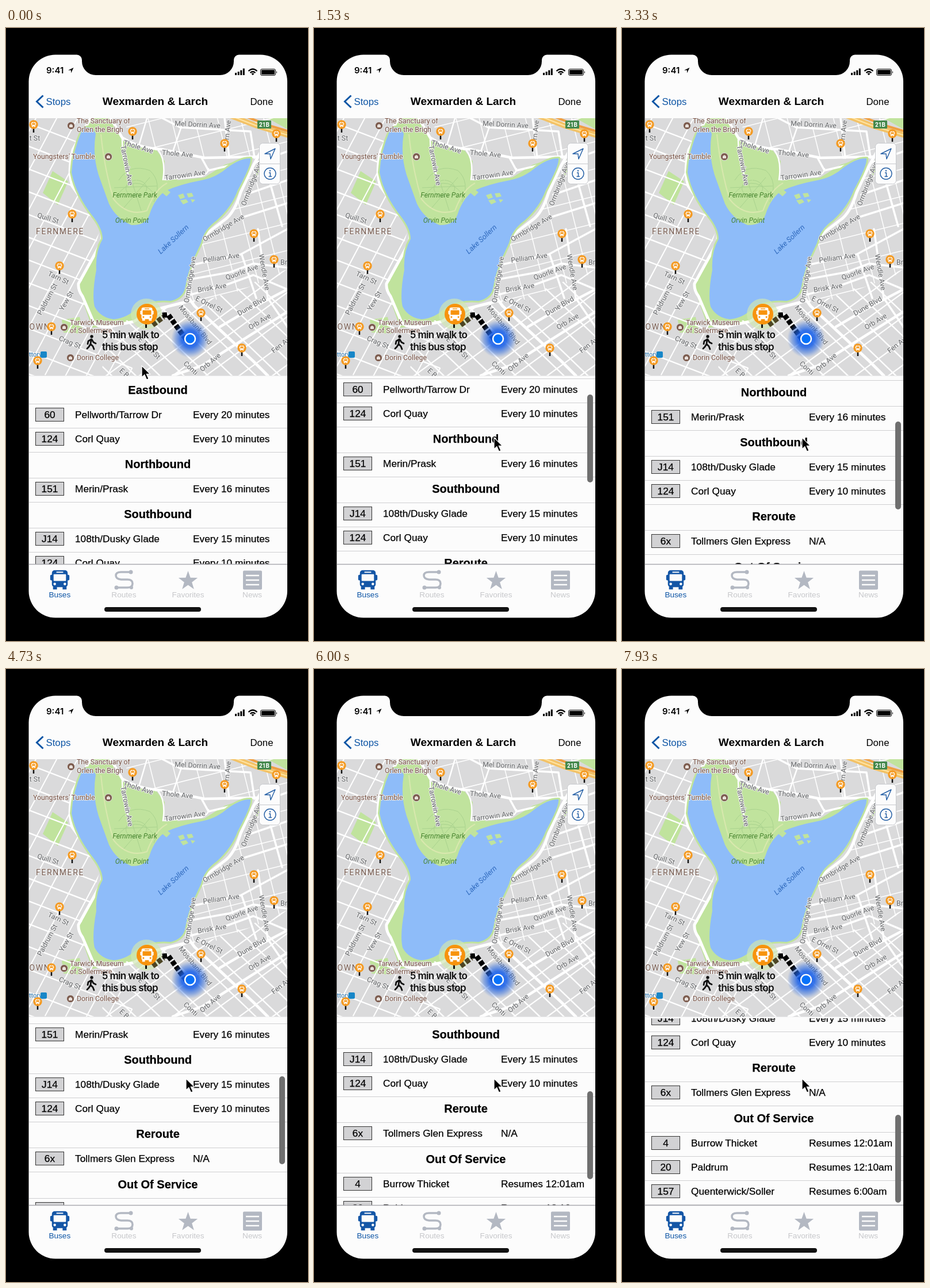
Animation, 525 px wide and 1067 px high, one loop 8000 ms. Source, as an HTML page:

```html
<!DOCTYPE html>
<html lang="en">
<head>
<meta charset="utf-8">
<title>Bus stop</title>
<style>
html, body { margin: 0; width: 100%; height: 100%; overflow: hidden; background: #000; }
svg { display: block; width: 100%; height: 100%; }
text { font-family: "Liberation Sans", Arial, sans-serif; font-size: 17.3px; fill: #000; }
#list text { stroke: #000; stroke-width: .25px; }
.map text { font: 12.3px Roboto, sans-serif; fill: #626467; text-anchor: middle; paint-order: stroke; stroke: #eee; stroke-width: 2px; stroke-linejoin: round; }
.map .place { fill: #775245; text-anchor: start; }
.map .park { font-style: italic; fill: #48852f; stroke: none; }
.map .water { font-style: italic; fill: #2e69bd; stroke: none; font-size: 12.8px; }
.map .area { font-size: 14px; letter-spacing: 1.6px; fill: #765b50; }
.map .walk { font: 600 17px Inter, sans-serif; letter-spacing: -.65px; fill: #111; text-anchor: start; stroke: none; }
.head { font-weight: bold; font-size: 20px; text-anchor: middle; }
.num { text-anchor: middle; }
.tab { font-size: 13.6px; text-anchor: middle; fill: #c7c8cb; }
.road { fill: none; stroke: #fff; stroke-linejoin: round; stroke-linecap: round; }
</style>
</head>
<body>
<svg id="stage" viewBox="0 0 525 1067" xmlns="http://www.w3.org/2000/svg">
  <defs>
    <clipPath id="mapClip"><rect x="40" y="157" width="449" height="448.500"/></clipPath>
    <clipPath id="listClip"><rect x="40" y="608" width="449" height="325"/></clipPath>
    <clipPath id="west"><path d="M40 157H143L112 230L113 270L163 352L150 400L125 455L148 508L190 520L225 605H40Z"/></clipPath>
    <clipPath id="south"><path d="M180 516L222 506L252 490L305 480L360 470L489 420V605H165Z"/></clipPath>
    <clipPath id="north"><path d="M200 157H489V425L360 475L318 478L326 410L345 365L395 320L436 230L345 226L230 208Z"/></clipPath>
    <radialGradient id="glow">
      <stop offset="0" stop-color="#0b5fff"/><stop offset=".45" stop-color="#175fe8" stop-opacity=".85"/>
      <stop offset=".75" stop-color="#2d6be0" stop-opacity=".45"/><stop offset="1" stop-color="#3d76e0" stop-opacity="0"/>
    </radialGradient>
  </defs>

  <rect width="525" height="1067"/>
  <path fill="#fcfcfc" d="M86 46.500H123A9 9 0 0 1 132 55.500V58A24 24 0 0 0 156 82H372A24 24 0 0 0 396 58V55.500A9 9 0 0 1 405 46.500H442.500A46.500 46.500 0 0 1 489 93V980A46.500 46.500 0 0 1 442.500 1026.500H86A46.500 46.500 0 0 1 39.500 980V93A46.500 46.500 0 0 1 86 46.500Z"/>

  <g id="status">
    <text x="70" y="79" style="font:600 15px Inter,sans-serif">9:41</text>
    <path d="M108 73.500L117.500 69L113 78.500V73.500Z"/>
    <path d="M398 78h3v4h-3zM402.700 76h3v6h-3zM407.300 73.500h3v8.500h-3zM411.800 70.500h3v11.500h-3z"/>
    <path fill="none" stroke="#000" stroke-width="2.300" d="M421.500 75Q429 68 436.500 75M424.500 78Q429 74 433.500 78"/>
    <path d="M426.500 79.500Q429 77.500 431.500 79.500L429 82.200Z"/>
    <rect x="442.500" y="71.500" width="26" height="11" rx="2.500" fill="none" stroke="#000"/>
    <rect x="444" y="73" width="23" height="8" rx="1"/><path d="M470 75q2 2 0 4z"/>
  </g>
  <path fill="none" stroke="#0d55a5" stroke-width="3" d="M64.500 117.500L53.500 128L64.500 138.500"/>
  <text x="69.500" y="134" style="fill:#0d55a5;font-size:16.800px">Stops</text>
  <text x="259.500" y="134" class="head" style="font-size:19px">Wexmarden &amp; Larch</text>
  <text x="464.500" y="134" text-anchor="end" style="font-size:16.800px">Done</text>

  <g class="map" clip-path="url(#mapClip)">
    <rect x="39" y="157" width="450" height="449" fill="#dadadb"/>
    <g id="green" fill="#c0e39d">
      <path d="M144 157H180L204 197L262 213L276 232L272 265L300 260L292 276L262 300L240 350H190L140 240Z"/>
      <path d="M64 287L81 249L108 267L90 308Z"/>
      <path d="M160 385L124 449L150 522L218 512L252 487L165 480Z"/>
      <path d="M262 302L278 267L345 260L380 238L430 222L425 240L395 250L300 290Z"/>
      <path d="M97 508L128 503L135 532L100 530ZM455 157H489V176ZM440 228L449 230L434 262Z"/>
    </g>
    <g id="grids" class="road"></g>
    <g class="road" stroke-width="3.500">
      <path stroke-width="5" d="M147 157L116 212Q107 250 115 275L160 338Q172 360 163 378L126 445Q125 456 133 467L150 507Q156 522 178 520L222 511L252 492L312 477"/>
      <path stroke-width="4.500" d="M182 157L202 191Q230 209 270 211L345 226L440 224"/>
      <path stroke-width="5" d="M443 215L428 243L408 286Q397 322 380 334L350 357Q329 385 324 415L314 465L328 484L430 580L455 605"/>
      <path d="M272 157L303 173L425 180M380 157L388 226M425 180L432 226M340 226L352 248L420 232"/>
      <path stroke-width="2.500" d="M276 264L340 258Q352 253 352 245M202 194Q202 235 216 263M265 213Q278 230 273 264M230 208L245 157M290 215L310 157"/>
      <path d="M330 411L408 394L489 350M323 437L390 425L430 410L489 417M318 465L380 448L430 430L489 455M410 395L435 470M438 350L455 470L489 520M403 332L489 305M416 290L489 265M432 235L489 215M455 255L480 345"/>
      <path stroke-width="4.500" d="M372 520L430 486L489 455M290 605L340 588L489 494"/>
    </g>
    <path fill="none" stroke="#f3c266" stroke-width="9" d="M386 151L435 170L495 188"/>
    <path fill="none" stroke="#ef9f42" stroke-width="4" d="M417 154L455 169L495 181"/>
    <path fill="none" stroke="#ffe4a4" stroke-width="2" d="M386 151L435 170L495 188"/>
    <path fill="#8ebcf9" stroke="#c0e39d" stroke-width="6" paint-order="stroke" d="M132 178Q145 165 156 184Q150 220 161 256L179 306Q191 331 218 343Q242 344 249 326Q257 299 276 284Q302 272 340 265Q366 260 385 243Q408 226 425 227Q427 238 403 282Q392 312 366 335Q344 351 339 374L326 402Q316 425 312 449Q309 470 286 475Q250 472 228 487Q211 505 187 507Q164 504 154 485Q149 464 157 421Q155 390 168 367Q168 350 152 329Q121 290 114 251Q116 215 132 178Z"/>
    <path fill="#c0e39d" d="M272 287l8-6 6 5-7 7zM299 291l9-3 3 7-8 3zM314 288l9-1 3 6-9 2zM303 300l10-2 4 5-9 4zM321 298l8 1-5 5z"/>
    <path fill="none" stroke="#a9d28e" stroke-width="1" d="M196 265Q215 235 250 248Q272 268 257 303M191 293Q225 250 257 288M203 315L250 260M215 255L235 318M188 278L262 275M226 265a18 14 0 1 0 1 0"/>
    <path fill="none" stroke="#d9e8ae" stroke-width="2" d="M165 185Q171 245 187 298Q212 329 245 318Q259 280 280 270"/>
    <rect x="437" y="161" width="24" height="14" rx="1" fill="#44884c"/>
    <text x="449" y="172" style="font-size:10px;font-weight:700;fill:#fff;stroke:none">21B</text>
    <g id="labels"></g>
    <g id="pins"></g>
    <circle cx="244" cy="498" r="27" fill="#d0e8b4" opacity=".68"/>
    <path stroke="#111" stroke-width="3" d="M243.500 512V522"/>
    <g fill="none" stroke="#000" stroke-width="9" stroke-dasharray="8 3">
      <path stroke="#4c4525" d="M255 517L274 503"/><path d="M272 500L282 499L313 542"/>
    </g>
    <circle cx="245" cy="498" r="18" fill="#f7930d"/>
    <g id="stop"></g>
    <circle cx="320" cy="541" r="33" fill="url(#glow)"/>
    <circle cx="320" cy="541" r="9" fill="#0872fa" stroke="#fff" stroke-width="2.500"/>
    <g fill="none" stroke="#111" stroke-width="2.800" stroke-linecap="round" stroke-linejoin="round">
      <circle cx="149" cy="537" r="1.300"/><path d="M148 542L147 550L151 554L153 559M147 550L144 555L141 558M148 542L143 545L142 550M149 542L152 547L156 549"/>
    </g>
    <text class="walk" x="167" y="540">5 min walk to</text>
    <text class="walk" x="167" y="561">this bus stop</text>
    <rect x="440.500" y="200.500" width="36" height="71" rx="6" fill="#fcfcfc" stroke="#c6c8cc"/>
    <path stroke="#c6c8cc" d="M441 236.500H476"/>
    <g fill="none" stroke="#2862a7" stroke-width="1.500">
      <path stroke-linejoin="round" d="M450 219L468 210L460 228L459 219Z"/><circle cx="459" cy="253.500" r="10"/>
      <path d="M457 252H459.500V258.500M456.500 258.500H462"/>
    </g>
    <circle cx="459" cy="248.500" r="1.200" fill="#2862a7"/>
  </g>

  <g clip-path="url(#listClip)"><g id="list"></g></g>
  <rect id="bar" x="475" width="10" height="153" rx="5" fill="#6f6f6f"/>
  <path stroke="#aaaab0" stroke-width="1.500" d="M40 933.500H489"/>
  <g id="tabs"></g>
  <rect x="171" y="1008" width="168" height="8" rx="4" fill="#111"/>
  <path id="cursor" d="M0 0V20L4.800 15.500L8.500 24L12 22.500L8.300 14.300H14.500Z" stroke="#fff" stroke-width="1.200"/>
</svg>
<script>
const $ = id => document.getElementById(id);

// Upright bus drawn around (x, y), 34 units tall at size 1
const bus = (x, y, size, body, glass) => `<g transform="translate(${x} ${y}) scale(${size})" fill="${body}">
  <rect x="-14" y="-17" width="28" height="30" rx="5"/><rect x="-17" y="-9" width="34" height="10" rx="2"/>
  <path d="M-12 12h7v5h-7zM5 12h7v5h-7z"/>
  <g fill="${glass}"><rect x="-11" y="-10" width="22" height="12" rx="1"/><rect x="-6" y="-14.500" width="12" height="2"/>
  <circle cx="-9" cy="7.500" r="2.300"/><circle cx="9" cy="7.500" r="2.300"/></g></g>`;

const label = (x, y, str, turn = 0, cls = "") =>
  `<text class="${cls}" transform="translate(${x} ${y}) rotate(${turn})" y="4">${str}</text>`;

// Parallel streets inside a clipped district
function streets(clip, x, y, turn, gap, count, width) {
  let d = "";
  for (let i = 0; i < count; i++) d += `M-400 ${i * gap}H400`;
  return `<g clip-path="url(#${clip})"><path transform="translate(${x} ${y}) rotate(${turn})" d="${d}" stroke-width="${width}"/></g>`;
}

$("grids").innerHTML =
  streets("west", 70, 178, 21, 37, 12, 2.4) + streets("west", 30, 130, -62, 32, 13, 2) +
  streets("south", 420, 430, 44, 29, 11, 2.4) + streets("south", 170, 440, -36, 34, 12, 2.2) +
  streets("north", 300, 150, -14, 46, 8, 1.5) + streets("north", 320, 450, 76, -39, 6, 1.5);

$("labels").innerHTML = [
  [123, 162, "The Sanctuary of", 0, "place"], [123, 177, "Orlen the Brigh", 0, "place"],
  [47, 224, "Youngsters' Tumble", 0, "place"],
  [111, 513, "Tarwick Museum", 0, "place"], [111, 527, "of Sollermere", 0, "place"],
  [123, 574, "Dorin College", 0, "place"],
  [224, 291, "Fernmere Park", 0, "park"], [219, 335, "Orvin Point", 0, "park"],
  [291, 368, "Lake Sollern", -43, "water"],
  [94, 355, "FERNMERE", 0, "area"], [59, 521, "OWN", 0, "area"],
  [333, 168, "Mel Dorrin Ave", 3], [230, 207, "Thole Ave", 17], [298, 219, "Thole Ave", 5],
  [210, 239, "Tarrowin Ave", 79], [311, 256, "Tarrowin Ave", -8], [385, 181, "orn Ave", -84],
  [427, 271, "Ormbridge Ave", -69], [378, 348, "Ormbridge Ave", -31], [320, 438, "Ormbridge Ave", -81],
  [374, 400, "Pelliam Ave", -8], [410, 425, "Quorle Ave", -20], [449, 425, "Wendle Ave", 80],
  [358, 452, "Brisk Ave", -9], [483, 408, "Br"], [353, 481, "E Orrel St", 26],
  [427, 484, "Dune Blvd", -30], [329, 517, "Mossbank Blvd", 51],
  [441, 511, "Orb Ave", -31], [355, 582, "Orb Ave", -40], [480, 550, "Fen Ave", -38],
  [321, 592, "Conti", 43], [249, 557, "E Tarn St", 45], [207, 602, "E Br", 43],
  [73, 331, "Quill St", 17], [91, 435, "Tarn St", 25], [111, 547, "Crag St", 22],
  [72, 472, "Paldrum St", -62], [105, 475, "Yew St", -60], [50, 192, "t St"]
].map(a => label(...a)).join("") +
  `<text x="40" y="572" style="fill:#2b7ab8;text-anchor:start;font-size:11px">ttory</text>
   <rect x="60" y="563" width="11" height="11" rx="2" fill="#1786c8"/>`;

const spots = [[48,168],[220,180],[380,201],[470,184],[115,324],[93,414],[431,358],[466,403],[339,496],[410,557],[79,520],[55,579]];
const sights = [[113,170],[178,224],[101,521],[112,574]];
$("pins").innerHTML = spots.map(([x, y]) =>
  `<path stroke="#111" stroke-width="2.500" d="M${x} ${y + 7}v7"/><circle cx="${x}" cy="${y}" r="7.700" fill="#f49a22"/>` +
  bus(x, y, .25, "#fff", "#f49a22")).join("") +
  sights.map(([x, y]) => `<circle cx="${x}" cy="${y}" r="6.500" fill="#7b5a4c" stroke="#ddd"/>
    <path d="M${x - 3} ${y + 3}v-4l3-2 3 2v4z" fill="#e8e0da"/>`).join("");
$("stop").innerHTML = bus(245, 498, .68, "#fff", "#f7930d");

// Timetable: headers are single strings, routes are triples
const rows = ["Eastbound", ["60", "Pellworth/Tarrow Dr", "Every 20 minutes"], ["124", "Corl Quay", "Every 10 minutes"],
  "Northbound", ["151", "Merin/Prask", "Every 16 minutes"],
  "Southbound", ["J14", "108th/Dusky Glade", "Every 15 minutes"], ["124", "Corl Quay", "Every 10 minutes"],
  "Reroute", ["6x", "Tollmers Glen Express", "N/A"],
  "Out Of Service", ["4", "Burrow Thicket", "Resumes 12:01am"], ["20", "Paldrum", "Resumes 12:10am"],
  ["157", "Quenterwick/Soller", "Resumes 6:00am"]];
let bottom = 609;
$("list").innerHTML = rows.map(row => {
  const isHead = typeof row === "string";
  bottom += isHead ? 45.2 : 42;
  const line = Math.floor(bottom), y = line - 17;
  return `<path stroke="#cfcfd1" d="M40 ${line + .5}H489"/>` + (isHead
    ? `<text class="head" x="264" y="${y}">${row}</text>`
    : `<rect x="51.5" y="${y - 17.5}" width="49" height="23" fill="#d2d2d4" stroke="#333"/>
       <text class="num" x="76" y="${y}">${row[0]}</text><text x="120" y="${y}">${row[1]}</text>
       <text x="325" y="${y}">${row[2]}</text>`);
}).join("");

let star = "";
for (let i = 0; i < 10; i++) {
  const r = i % 2 ? 7 : 17.5, a = i * Math.PI / 5;
  star += `${316.5 + r * Math.sin(a)},${962.5 - r * Math.cos(a)} `;
}
const grey = "#b3b8c2";
$("tabs").innerHTML = bus(93.500, 960.500, .98, "#1456a6", "#fcfcfc") +
  `<path fill="none" stroke="${grey}" stroke-width="3.500" d="M218 947H200Q191 947 191 953T200 960H211Q220 960 220 967T211 974H192"/>
   <circle cx="217" cy="947" r="3.500" fill="${grey}"/><circle cx="192" cy="974" r="3.500" fill="${grey}"/><circle cx="218" cy="974" r="3" fill="${grey}"/>
   <polygon points="${star}" fill="${grey}"/>
   <rect x="412" y="944.500" width="33" height="33" rx="2" fill="${grey}"/>
   <path stroke="#fcfcfc" stroke-width="2.500" d="M417 953H440M417 961H440M417 969H440"/>` +
  ["Buses", "Routes", "Favorites", "News"].map((s, i) =>
    `<text class="tab" x="${93.3 + i * 111.6}" y="991"${i ? "" : ' style="fill:#0d55a5"'}>${s}</text>`).join("");

const LOOP = 8000;
const scrollKeys = [[900, 0], [1530, 44], [2400, 55], [3330, 125], [5330, 183], [6730, 241], [7850, 281]];
const slope = i => {
  const k = scrollKeys;
  return k[i] && k[i + 1] ? (k[i + 1][1] - k[i][1]) / (k[i + 1][0] - k[i][0]) : 0;
};
// Harmonic mean keeps the curve from overshooting
const tangent = i => {
  const a = slope(i - 1), b = slope(i);
  return a && b ? 2 * a * b / (a + b) : 0;
};

function scrollAt(t) {
  if (t <= scrollKeys[0][0]) return 0;
  const i = scrollKeys.findIndex(k => k[0] >= t) - 1;
  if (i < 0) return scrollKeys[scrollKeys.length - 1][1];
  const [t0, y0] = scrollKeys[i], [t1, y1] = scrollKeys[i + 1];
  const h = t1 - t0, u = (t - t0) / h, v = 1 - u;
  return v * v * (1 + 2 * u) * y0 + u * u * (3 - 2 * u) * y1 +
    h * u * v * (v * tangent(i) - u * tangent(i + 1));
}

function draw(t) {
  const y = Math.round(scrollAt(t));
  $("list").setAttribute("transform", `translate(0 ${-y})`);
  $("bar").setAttribute("y", Math.round(612.4 + y * .582));
  $("bar").setAttribute("visibility", y > 0 ? "visible" : "hidden");
  const u = Math.min(1, Math.max(0, (t - 100) / 800)), e = u * u * (3 - 2 * u);
  $("cursor").setAttribute("transform", `translate(${236 + 77 * e} ${588 + 125 * e})`);
}

const start = performance.now();
function tick(now) {
  draw(Math.max(0, now - start) % LOOP);
  requestAnimationFrame(tick);
}
draw(0);
requestAnimationFrame(tick);
</script>
</body>
</html>
```
